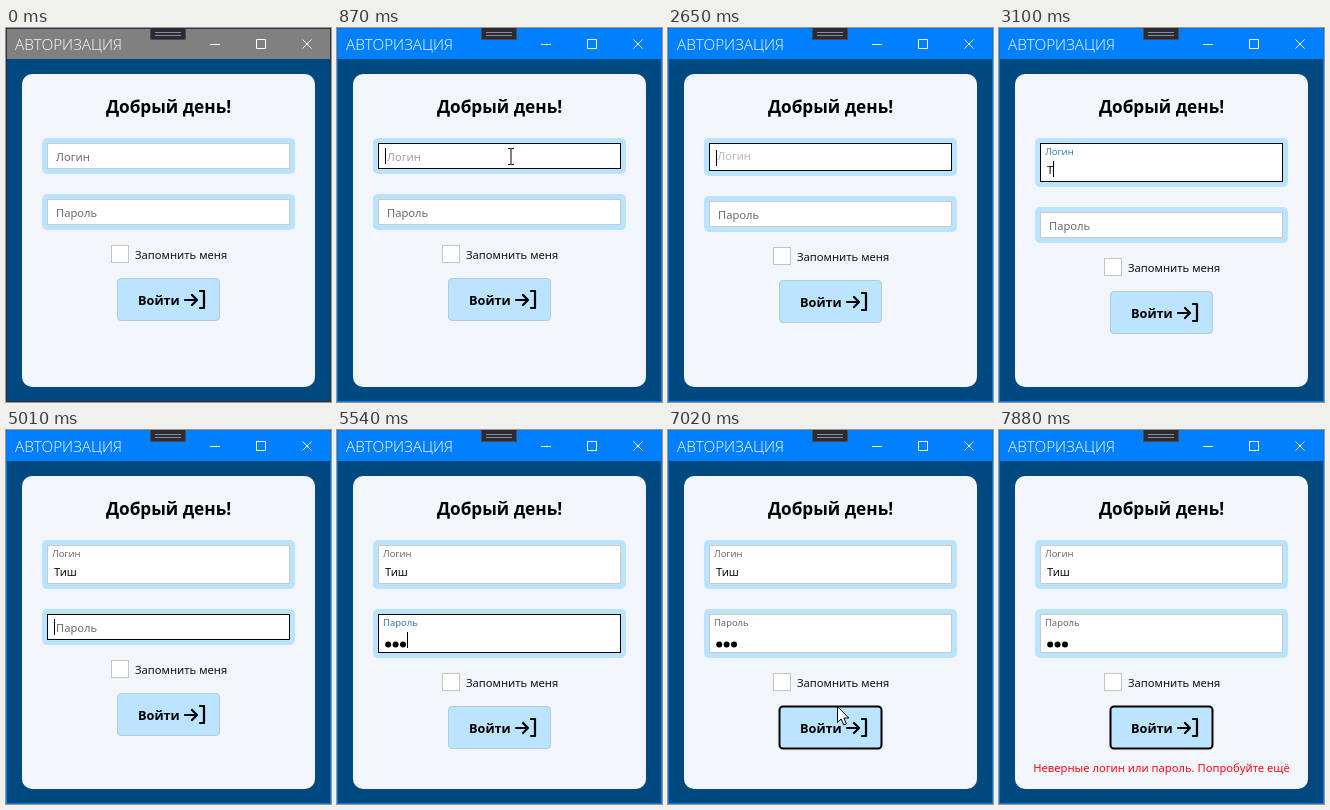
An HTML page for the animation above (8000 ms loop, 325x374 px).

```html
<!DOCTYPE html>
<html lang="ru">
<head>
<meta charset="utf-8">
<title>Авторизация</title>
<style>
  html, body { margin: 0; width: 100%; height: 100%; overflow: hidden; background: #004880; }
  svg { display: block; width: 100vw; height: 100vh; }
  text { font: 11.2px "Noto Sans", "Open Sans", sans-serif; fill: #111; white-space: pre; }
  .title { font: 300 15.3px "Open Sans", "Noto Sans", sans-serif; fill: #fff; }
  .head { font-weight: 700; font-size: 17.2px; fill: #000; text-anchor: middle; }
  .enter { font-weight: 700; font-size: 12.7px; fill: #000; }
  .error { fill: #ff0a14; text-anchor: middle; }
  .sys { fill: none; stroke: #fff; }
  .icon { fill: none; stroke: #000; stroke-width: 2.2; stroke-linecap: round; stroke-linejoin: round; }
</style>
</head>
<body>
<svg viewBox="0 0 325 374">
  <rect width="325" height="374" fill="#004880"/>
  <rect id="bar" width="325" height="31"/>
  <rect id="edge" x=".5" y=".5" width="324" height="373" fill="none"/>
  <text class="title" x="9" y="22">АВТОРИЗАЦИЯ</text>
  <path class="sys" d="M204 16.5h10M250.5 11.5h9v9h-9zM296.5 11.5l9 9m0-9l-9 9"/>
  <rect x="144.5" y="-.5" width="35" height="12" fill="#2b2b33" stroke="#4a4a52"/>
  <path d="M149 4.5h26M149 7.5h26" stroke="#8c8c9c"/>
  <rect x="16" y="46" width="293" height="313" rx="10" fill="#f2f6fa"/>
  <text class="head" x="162.5" y="85">Добрый день!</text>
  <g id="fields"></g>
  <g id="rest">
    <rect x="105.5" y="217.5" width="17" height="17" fill="#fff" stroke="#c6c4c2"/>
    <text x="129" y="231">Запомнить меня</text>
    <rect id="btn" x="111.5" y="250.5" width="102" height="42" rx="3.5" fill="#bae4ff"/>
    <text class="enter" x="132" y="277">Войти</text>
    <path class="icon" d="M179 272h12m-5-5l5 5-5 5M194 263h4v17h-4"/>
  </g>
  <text id="error" class="error" x="162.5" y="342">Неверные логин или пароль. Попробуйте ещё</text>
  <path id="arrow" d="M.5.5v16l3.7-3.5 2.6 6 2.6-1.1-2.6-5.9h5z" fill="#fff" stroke="#000"/>
  <path id="beam" d="M-3 -7.5h2.5l.5.5.5-.5h2.500M0 -7v15M-3 8.500h2.5l.5-.5.5.5h2.5" fill="none" stroke="#000"/>
</svg>
<script>
const LOOP = 8000, GROW = 13, BLINK = 530;
const GREY = [104, 108, 112], LIGHT = [192, 194, 196], BLUE = [48, 120, 190];
const LINE = [203, 202, 200], BLACK = [0, 0, 0];

// time, login text
const TYPED = [[0, ''], [1660, 'F'], [2500, ''], [2930, 'Т'], [4010, 'Ти'], [4620, 'Тиш']];
// time, number of password dots
const DOTS = [[0, 0], [5360, 1], [5440, 2], [5540, 3]];
// moments that restart the caret
const CARET = [850, 1660, 2500, 2930, 4010, 4620, 5010, 5360, 5440, 5540];
// time, x, y of the pointer tip
const PATH_IN = [[60, 287, 356], [180, 262, 290], [300, 215, 198], [410, 180, 136], [470, 174, 128], [1660, 174, 128]];
const PATH_CLICK = [[5950, 295, 176], [6130, 250, 222], [6340, 173, 284], [6960, 172, 284],
  [7020, 168, 276], [7140, 291, 291], [7200, 306, 293]];

const $ = id => document.getElementById(id);
const clamp = v => Math.min(1, Math.max(0, v));
const lerp = (a, b, k) => a + (b - a) * k;
const ramp = (t, from, ms) => clamp((t - from) / ms);
const outCubic = k => 1 - (1 - k) ** 3;
const mix = (a, b, k) => a.map((v, i) => lerp(v, b[i], k));
const rgb = c => `rgb(${c.map(Math.round)})`;
const current = (table, t) => table.filter(s => s[0] <= t).pop()[1];
const set = (el, attrs) => { for (const k in attrs) el.setAttribute(k, attrs[k]); };

function add(parent, tag, attrs = {}) {
  const el = document.createElementNS('http://www.w3.org/2000/svg', tag);
  set(el, attrs);
  return parent.appendChild(el);
}

function makeField(hint) {
  const g = add($('fields'), 'g');
  const field = {
    g,
    halo: add(g, 'rect', { width: 253, rx: 5, fill: '#bae3fe' }),
    box: add(g, 'rect', { x: 5.5, y: 5.5, width: 242, fill: '#fff' }),
    hint: add(g, 'text'),
    text: add(g, 'text', { x: 12 }),
    dots: [0, 1, 2].map(i => add(g, 'circle', { cx: 15.2 + i * 7.4, r: 3 })),
    caret: add(g, 'rect', { width: 1, height: 16 })
  };
  field.hint.textContent = hint;
  return field;
}

function drawField(f, s) {
  const grow = Math.round(GROW * s.up);
  set(f.g, { transform: `translate(36 ${s.y})` });
  set(f.halo, { height: 36 + grow });
  set(f.box, { height: 25 + grow, stroke: rgb(mix(LINE, BLACK, s.border)) });
  set(f.hint, { x: lerp(14, 10, s.up), y: lerp(23, 17, s.up) });
  const idle = mix(GREY, LIGHT, s.focus), lifted = mix(GREY, BLUE, s.focus);
  f.hint.style.fontSize = lerp(11.2, 9.4, s.up) + 'px';
  f.hint.style.fill = rgb(mix(idle, lifted, s.up));
  f.text.textContent = s.text;
  set(f.text, { y: 23 + grow });
  f.dots.forEach((d, i) => set(d, { cy: 22.5 + grow, opacity: i < s.dots ? 1 : 0 }));
  const end = s.dots ? 11.5 + s.dots * 7.4 : s.text ? f.text.getComputedTextLength() + 12 : 12;
  set(f.caret, { x: Math.round(end), y: 10 + grow, opacity: s.caret ? 1 : 0 });
  return grow;
}

function along(path, t) {
  const i = path.findIndex(p => p[0] > t);
  if (i < 1) return null;
  const [a, b] = [path[i - 1], path[i]], k = ramp(t, a[0], b[0] - a[0]);
  return [lerp(a[1], b[1], k), lerp(a[2], b[2], k)];
}

function drawPointer(t) {
  const p = along(PATH_IN, t) || along(PATH_CLICK, t);
  const overText = p && t < 1660 && p[1] < 141;
  set($('arrow'), { opacity: p && !overText ? 1 : 0 });
  set($('beam'), { opacity: overText ? 1 : 0 });
  if (p) set($(overText ? 'beam' : 'arrow'), { transform: `translate(${p.map(Math.round)})` });
}

const login = makeField('Логин'), pass = makeField('Пароль');

function draw(t) {
  const active = t >= 690, inLogin = active && t < 5010, inPass = t >= 5010 && t < 6570;
  const restart = CARET.filter(c => c <= t).pop();
  const lit = restart !== undefined && Math.floor((t - restart) / BLINK) % 2 === 0;
  const rise = (from, ms) => outCubic(ramp(t, from, ms));

  set($('bar'), { fill: active ? '#0080ff' : '#808080' });
  set($('edge'), { stroke: active ? '#0078e8' : '#30343a' });

  const loginUp = t < 2510 ? rise(1660, 300) : t < 2930 ? 1 - rise(2510, 280) : rise(2930, 250);
  const first = drawField(login, {
    y: 110, up: loginUp, dots: 0, text: current(TYPED, t),
    border: t < 5010 ? ramp(t, 400, 150) : 0,
    focus: inLogin ? ramp(t, 690, 300) : 0,
    caret: inLogin && lit
  });
  const second = drawField(pass, {
    y: 166 + first, up: rise(5360, 250), dots: current(DOTS, t), text: '',
    border: inPass ? 1 : 0,
    focus: inPass ? ramp(t, 5010, 180) : 1 - ramp(t, 6570, 170) - (t < 5010 ? 1 : 0),
    caret: inPass && lit
  });

  const pressed = t >= 6570;
  set($('rest'), { transform: `translate(0 ${first + second})` });
  set($('btn'), { stroke: pressed ? '#000' : '#b4cad8', 'stroke-width': pressed ? 2 : 1 });
  set($('error'), { opacity: ramp(t, 7620, 240) });
  drawPointer(t);
}

const start = performance.now();
function tick() {
  draw((performance.now() - start) % LOOP);
  requestAnimationFrame(tick);
}
tick();
</script>
</body>
</html>
```
